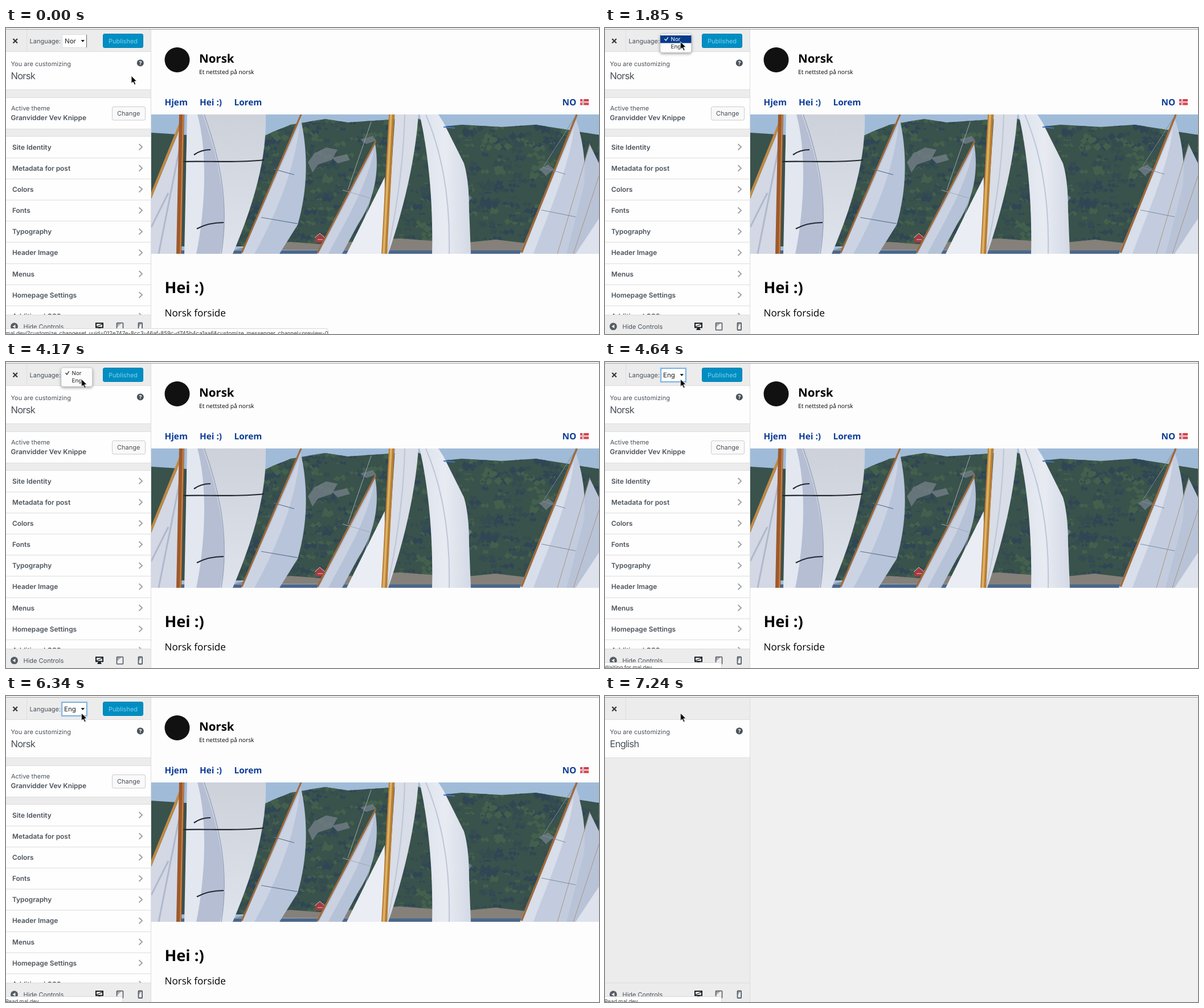
Animation of 1041 by 538 pixels, one loop 8 s. Source, as an HTML page:

```html
<!DOCTYPE html>
<html lang="en">
<head>
<meta charset="utf-8">
<title>Customizer language switch</title>
<style>
html, body { margin: 0; width: 100%; height: 100%; overflow: hidden; background: #f0f0f0; }
svg { display: block; }
text { font: 11px Inter, sans-serif; fill: #4b525b; white-space: pre; text-rendering: geometricPrecision; }
.semi { font-size: 11.9px; font-weight: 600; }
.title { font-size: 16.5px; font-weight: 400; letter-spacing: -.045em; }
.pick { font-size: 11.5px; fill: #222; }
.menu text { font-size: 9.8px; fill: #222; }
.web text { font-family: "Open Sans", sans-serif; fill: #000; }
.web .b { font-weight: 700; }
.web .nav { font-size: 15.3px; fill: #0c3c97; }
.status text { font-size: 9.2px; fill: #444; }
.status .url { font-size: 9.62px; }
.line { fill: none; stroke: #ddd; }

/* every timed part shares one 8 s clock with hard cuts */
.t { animation: 8s step-end infinite; }
.before { animation-name: before; }
.after { animation-name: after; }
.icons { animation-name: icons; }
.nor { animation-name: nor; }
.eng { animation-name: eng; }
.menu { animation-name: menu; }
.hiNor { animation-name: hiNor; }
.hiEng { animation-name: hiEng; }
.menu .inkNor { animation-name: inkNor; }
.menu .inkEng { animation-name: inkEng; }
.s0 { animation-name: s0; }
.bar { animation-name: bar; }
.s1 { animation-name: s1; }
.s2 { animation-name: s2; }
.s3 { animation-name: s3; }
.s4 { animation-name: s4; }
.s5 { animation-name: s5; }
.s6 { animation-name: s6; }
.cursor { animation-name: cursor; }
@keyframes before { 0% { opacity: 1 } 86.75%, 100% { opacity: 0 } }
@keyframes after { 0% { opacity: 0 } 86.75%, 100% { opacity: 1 } }
@keyframes icons { 0% { opacity: 1 } 86.75% { opacity: 0 } 90.5%, 100% { opacity: 1 } }
@keyframes nor { 0% { opacity: 1 } 53.5%, 100% { opacity: 0 } }
@keyframes eng { 0% { opacity: 0 } 53.5% { opacity: 1 } 86.75%, 100% { opacity: 0 } }
@keyframes menu { 0% { opacity: 0 } 22% { opacity: 1 } 53.5%, 100% { opacity: 0 } }
@keyframes hiNor { 0% { opacity: 1 } 35.5%, 100% { opacity: 0 } }
@keyframes hiEng { 0% { opacity: 0 } 35.5% { opacity: 1 } 52.125%, 100% { opacity: 0 } }
@keyframes inkNor { 0% { fill: #fff } 35.5%, 100% { fill: #222 } }
@keyframes inkEng { 0% { fill: #222 } 35.5% { fill: #fff } 52.125%, 100% { fill: #222 } }
@keyframes s0 { 0% { opacity: 1 } 3.25% { opacity: .5 } 4.75%, 100% { opacity: 0 } }
@keyframes bar { 0% { opacity: 0 } 54.75% { opacity: .5 } 56.125%, 100% { opacity: 1 } }
@keyframes s1 { 0% { opacity: 0 } 54.75% { opacity: 1 } 58%, 100% { opacity: 0 } }
@keyframes s2 { 0% { opacity: 0 } 58% { opacity: 1 } 72.625%, 100% { opacity: 0 } }
@keyframes s3 { 0% { opacity: 0 } 72.625% { opacity: 1 } 77.5%, 100% { opacity: 0 } }
@keyframes s4 { 0% { opacity: 0 } 77.5% { opacity: 1 } 79.25%, 100% { opacity: 0 } }
@keyframes s5 { 0% { opacity: 0 } 79.25% { opacity: 1 } 86.75% { opacity: 0 } 90.5%, 100% { opacity: 1 } }
@keyframes s6 { 0% { opacity: 0 } 86.75% { opacity: 1 } 90.5%, 100% { opacity: 0 } }
@keyframes cursor {
  0% { transform: translate(220px, 84px) }
  1.125% { transform: translate(189px, 79px) }
  3.25% { transform: translate(174px, 70px) }
  4.75% { transform: translate(164px, 63px) }
  7.75% { transform: translate(161px, 58px) }
  8.84% { transform: translate(156px, 51px) }
  9.93% { transform: translate(150px, 43px) }
  11.02% { transform: translate(144px, 36px) }
  12.11% { transform: translate(139px, 31px) }
  13.2% { transform: translate(135px, 28px) }
  14.29% { transform: translate(133px, 26px) }
  15.375% { transform: translate(132.5px, 25px) }
  17.625% { transform: translate(132.5px, 24px) }
  34.375% { transform: translate(132.5px, 25.5px) }
  35.5% { transform: translate(132.5px, 27px) }
  36.6% { transform: translate(132.5px, 28.5px) }
  37.625%, 100% { transform: translate(132.5px, 30px) }
}
</style>
</head>
<body>
<svg width="1041" height="538" viewBox="0 0 1041 538">
  <defs>
    <filter id="shadow" x="-30%" y="-30%" width="160%" height="180%">
      <feDropShadow dx="0" dy="2" stdDeviation="2.5" flood-opacity=".4"/>
    </filter>
    <linearGradient id="cloth">
      <stop offset="0" stop-color="#dde2ec"/><stop offset=".5" stop-color="#e8ebf2"/><stop offset="1" stop-color="#d3d9e5"/>
    </linearGradient>
    <linearGradient id="main" x2="0" y2="1">
      <stop offset="0" stop-color="#cdd1da"/><stop offset="1" stop-color="#dfe3ec"/>
    </linearGradient>
    <clipPath id="hill">
      <path id="ridge" d="M255 184L440 196 470 182 500 170 560 160 600 166 660 162 720 158 760 174 800 170 870 174 930 170 980 178 1041 188V384H255Z"/>
    </clipPath>
  </defs>

  <!-- shell -->
  <rect width="1041" height="538" fill="#f0f0f0"/>
  <rect width="254" height="538" fill="#ececec"/>
  <rect y="42" width="254" height="66" fill="#fefefe"/>
  <path class="line" d="M36.5 3V42M0 41.500H254M0 108.500H254"/>

  <g class="t before">
    <!-- site preview -->
    <g class="web">
      <rect x="255" width="786" height="538" fill="#fdfdfd"/>
      <circle cx="300.500" cy="56" r="22" fill="#111"/>
      <text class="b" x="339" y="61" style="font-size:20.5px">Norsk</text>
      <text x="339" y="80.500" style="font-size:10.3px">Et nettsted på norsk</text>
      <text class="b nav" x="278.500" y="136">Hjem</text>
      <text class="b nav" x="340" y="136">Hei :)</text>
      <text class="b nav" x="400.500" y="136">Lorem</text>
      <text class="b nav" x="976.500" y="136">NO</text>
      <rect x="1008" y="125" width="15" height="10.500" fill="#e23b3f"/>
      <path d="M1013 125v10.500M1008 130.250h15" stroke="#fff" stroke-width="2.600"/>
      <path d="M1013 125v10.500M1008 130.250h15" stroke="#7f88b4" stroke-width=".8"/>
      <text class="b" x="278.500" y="466" style="font-size:27.2px">Hei :)</text>
      <text x="278.500" y="506.500" style="font-size:17.1px">Norsk forside</text>
    </g>

    <!-- header picture -->
    <svg x="255" y="152" width="786" height="245" viewBox="255 152 786 245" fill="none">
      <rect x="255" y="152" width="786" height="245" fill="#a0bbd8"/>
      <use href="#ridge" fill="#39524c"/>
      <g id="trees" clip-path="url(#hill)"></g>
      <path d="M530 236l12-16 20-10 20 4-10 18-24 8-10 14ZM572 228l26-6 6 10-22 6ZM780 300l24-12 14 10-10 14-24 2ZM936 248l16-8 10 8-14 12ZM622 196l22-6 6 8-18 6Z" fill="#737f86" opacity=".8"/>
      <path d="M400 390l40-8 60-6 50 4 60-4 80-6 110 8 60-6 50 6 121 6V392Z" fill="#85807a"/>
      <path d="M255 391H1041V397H255Z" fill="#4c678b"/>
      <path d="M543 377v-9l8-7 9 7v9Z" fill="#a23c40"/>
      <path d="M542 369l9-8 9 8M547 372h9" stroke="#d5cfd0"/>

      <path d="M304 180L255 300V397H301Z" fill="#d3d8e4"/>
      <path d="M304 215L268 397M255 350l30-60" stroke="#b0b9cc" stroke-width="3"/>
      <path d="M307 166L254 297" stroke="#c08a45" stroke-width="4.500"/>
      <path d="M318 152H456C458 230 435 310 398 397H313Z" fill="url(#main)"/>
      <path d="M328 152H345C372 225 394 320 376 397H326Z" fill="#b5bed3"/>
      <path d="M318 152h18C356 225 348 330 334 397H314Z" fill="#e3e7ef"/>
      <path d="M348 152C376 230 392 310 378 397" stroke="#9aa6c0" stroke-width="1.500"/>
      <path d="M311 235C350 233 400 238 453 232M330 223Q342 214 359 214M335 353Q355 342 382 342" stroke="#22262f" stroke-width="2.200"/>
      <path d="M308.500 152L303.500 397" stroke="#9d592c" stroke-width="9"/>
      <path d="M311 152L306 397" stroke="#c98244" stroke-width="2"/>

      <path d="M517 158C530 215 531 280 512 346L480 397H413Z" fill="#b7c4da"/>
      <path d="M515 170C508 250 468 340 436 397H415Z" fill="#ccd4e3"/>
      <path d="M518 152L414 395" stroke="#a0693a" stroke-width="3"/>
      <path d="M448 333l64 11M470 248l36 10" stroke="#60708c" stroke-width="1.200"/>

      <path d="M648 203C656 250 648 300 618 345L590 397H546Z" fill="#b6c2d8"/>
      <path d="M646 214C634 280 590 350 566 397H549Z" fill="#cad2e1"/>
      <path d="M649 199L547 395" stroke="#a0693a" stroke-width="3"/>
      <path d="M591 285l48 14M641 165L600 285M640 300l-28 97" stroke="#9fa9ae"/>
      <path d="M665 262L598 397H664Z" fill="#eaedf4"/>
      <path d="M683 152H724C718 240 694 330 671 397H667Z" fill="#d8dde7"/>
      <path d="M700 152C698 240 684 330 669 397" stroke="#bcc6d8" stroke-width="2"/>
      <path d="M677 152L664 397" stroke="#b87d32" stroke-width="10"/>
      <path d="M676 152L663 397" stroke="#ddb063" stroke-width="4"/>
      <path d="M726 152H759L768 166 804 238Q813 268 813 320L816 397H748C750 310 742 220 726 152Z" fill="url(#cloth)"/>
      <path d="M737 152C768 225 780 310 778 397" stroke="#bdc7d9" stroke-width="2"/>
      <path d="M768 174l20 2" stroke="#3f75c9" stroke-width="2"/>

      <path d="M1025 205L1041 238V397H968Z" fill="#b9c3d7"/>
      <path d="M1000 158C1014 200 1019 245 1014 280L984 397H902Z" fill="#c3ccde"/>
      <path d="M997 176C988 250 946 340 926 397H904Z" fill="#d8deea"/>
      <path d="M1041 335L1000 397H1041Z" fill="#dde2ec"/>
      <path d="M1025 203L968 397M1041 260l-45 137" stroke="#a9957f"/>
      <path d="M1002 152L905 395" stroke="#a0693a" stroke-width="3.500"/>
      <path d="M942 245l40 12M940 320l60 12M1000 155L942 246" stroke="#7d8b9f"/>
    </svg>

    <!-- controls -->
    <text x="41.500" y="26.500">Language:</text>
    <rect x="170.500" y="10.500" width="70" height="24" rx="2.500" fill="#008ec2" stroke="#007cb2"/>
    <text x="180" y="26.500" style="fill:#7fd0ea">Published</text>
    <g class="t nor">
      <rect x="98.500" y="11.500" width="43" height="23" fill="#fff" stroke="#ddd"/>
      <path d="M141.500 12V34" stroke="#666"/>
      <text class="pick" x="103" y="27">Nor</text>
    </g>
    <g class="t eng">
      <rect x="97.500" y="10.500" width="45" height="25" fill="none" stroke="#a9cdea" stroke-width="2"/>
      <rect x="98.500" y="11.500" width="43" height="23" fill="#fff" stroke="#5b9dd9"/>
      <text class="pick" x="102" y="27">Eng</text>
    </g>
    <path d="M131.500 21h6.500l-3.250 4Z" fill="#222"/>
    <g class="t menu">
      <rect x="97" y="10" width="54.500" height="33" rx="3.500" fill="#fcfcfc" stroke="#bbb" stroke-width=".6" filter="url(#shadow)"/>
      <rect class="t hiNor" x="97" y="13" width="54.500" height="13.500" fill="#063b8b"/>
      <rect class="t hiEng" x="97" y="26.500" width="54.500" height="13" fill="#063b8b"/>
      <path class="t inkNor" d="M104 19.500l1.200-.8 1.700 2.200 3.300-4.900 1 .7-4.200 6.300Z"/>
      <text class="t inkNor" x="115.500" y="23">Nor</text>
      <text class="t inkEng" x="115.500" y="36.300">Eng</text>
    </g>

    <text class="title" x="8.500" y="90">Norsk</text>
    <rect y="122" width="254" height="56" fill="#fefefe"/>
    <path class="line" d="M0 122.500H254M0 177.500H254"/>
    <text x="9" y="145">Active theme</text>
    <text class="semi" x="8.500" y="161.500">Granvidder Vev Knippe</text>
    <rect x="186.500" y="138.500" width="58" height="23.500" rx="2.500" fill="#f9f9f9" stroke="#ccc"/>
    <text x="195" y="154">Change</text>
    <rect y="191" width="254" height="313" fill="#fefefe"/>
    <path class="line" d="M0 190.500H254"/>
    <g id="rows"></g>
  </g>

  <path d="M12.500 19l7.500 7.500M20 19l-7.500 7.500" stroke="#33383d" stroke-width="2.200"/>
  <text x="8.500" y="66.500">You are customizing</text>
  <g class="t after"><text class="title" x="8.500" y="90">English</text></g>
  <circle cx="235.800" cy="61.500" r="6" fill="#4b525b"/>
  <text x="235.800" y="65" text-anchor="middle" style="font-size:9.5px;font-weight:700;fill:#fff">?</text>

  <!-- footer -->
  <rect y="504" width="254" height="34" fill="#ececec"/>
  <path class="line" d="M0 504.500H254M254.500 3V538"/>
  <text x="30.500" y="528.800">Hide Controls</text>
  <g class="t icons">
    <circle cx="14.500" cy="524.800" r="6.500" fill="#555d66"/>
    <path d="M16.500 521.500v6.500l-5-3.250Z" fill="#eee"/>
    <path d="M157 518h14v9.500h-5l2 3.500h-8l2-3.500h-5Z" fill="#191e23"/>
    <path d="M159 520h10L159 524.500Z" fill="#eee"/>
    <path d="M159 525.500L169 521.500V525.500Z" fill="#eee"/>
    <rect x="194.500" y="518.500" width="11" height="12.500" rx=".8" fill="#eee" stroke="#555d66" stroke-width="1.600"/>
    <path d="M195 519h8l-8 7Z" fill="#555d66" opacity=".45"/>
    <rect x="232.500" y="518.500" width="6.600" height="12.500" rx=".8" fill="#eee" stroke="#555d66" stroke-width="1.800"/>
    <path d="M233 519h5l-5 7Z" fill="#555d66" opacity=".5"/>
  </g>

  <rect width="1041" height="2" fill="#fafafa"/>
  <rect y="1.700" width="1041" height="1.200" fill="#a9a9ab"/>

  <!-- browser status line -->
  <g class="status">
    <g class="t s0">
      <path d="M-1 540V528.500H562q3.500 0 3.500 3.500v8Z" fill="#fdfdfd" stroke="#d8d8d8"/>
      <text class="url" x="-1" y="539.800">mal.dev/?customize_changeset_uuid=012e747e-8cc3-46af-859c-d745b4ca1aa6&amp;customize_messenger_channel=preview-0</text>
    </g>
    <path class="t bar" d="M-1 540V528.500H202q2.500 0 2.500 2.500v9Z" fill="#fdfdfd" stroke="#d8d8d8"/>
    <text class="t s1" x="-1" y="539.800">Read mal.dev</text>
    <text class="t s2" x="-1" y="539.800">Waiting for mal.dev</text>
    <text class="t s3" x="-1" y="539.800">Transferring data from mal.dev</text>
    <text class="t s4" x="-1" y="539.800">Waiting for fonts.googleapis.com</text>
    <text class="t s5" x="-1" y="539.800">Read mal.dev</text>
    <text class="t s6" x="-1" y="539.800">Waiting for use.fontawesome.com</text>
  </g>

  <g class="t cursor">
    <path d="M0 0V13.500L3.100 10.700 5.400 15.800 7.700 14.800 5.500 9.800H9.600Z" fill="#000" stroke="#fff" stroke-width=".9"/>
  </g>
</svg>
<script>
const sections = ["Site Identity", "Metadata for post", "Colors", "Fonts", "Typography",
  "Header Image", "Menus", "Homepage Settings", "Additional CSS"];
const step = 37.15;
document.getElementById("rows").innerHTML = sections.map((name, i) => {
  const y = 209.3 + i * step;
  const edge = Math.round(y + step / 2) + .5;
  return `<text class="semi" x="11" y="${y + 4.3}">${name}</text>
    <path d="M233.500 ${y - 5.2}l5.500 5.200-5.500 5.200" fill="none" stroke="#a0a5aa" stroke-width="2"/>
    <path class="line" d="M0 ${edge}H254"/>`;
}).join("");

// irregular patches of foliage
let seed = 7;
const rand = () => (seed = seed * 16807 % 2147483647) / 2147483647;
const clump = () => {
  const r = 2 + rand() * 5;
  const x = 400 + rand() * 641;
  const y = 160 + rand() * 225;
  const [a, b, c] = [rand, rand, rand].map(f => r * (.3 + f()));
  return `M${x} ${y}l${a} ${-b}l${r} ${c}l${b} ${-a}l${a} ${r}l${-c} ${b}l${-r} ${-a}l${-b} ${a}Z`;
};
document.getElementById("trees").innerHTML = ["#2f4655", "#43604c", "#344c50"].map(color =>
  `<path fill="${color}" d="${Array.from({ length: 260 }, clump).join("")}"/>`).join("");
</script>
</body>
</html>
```
